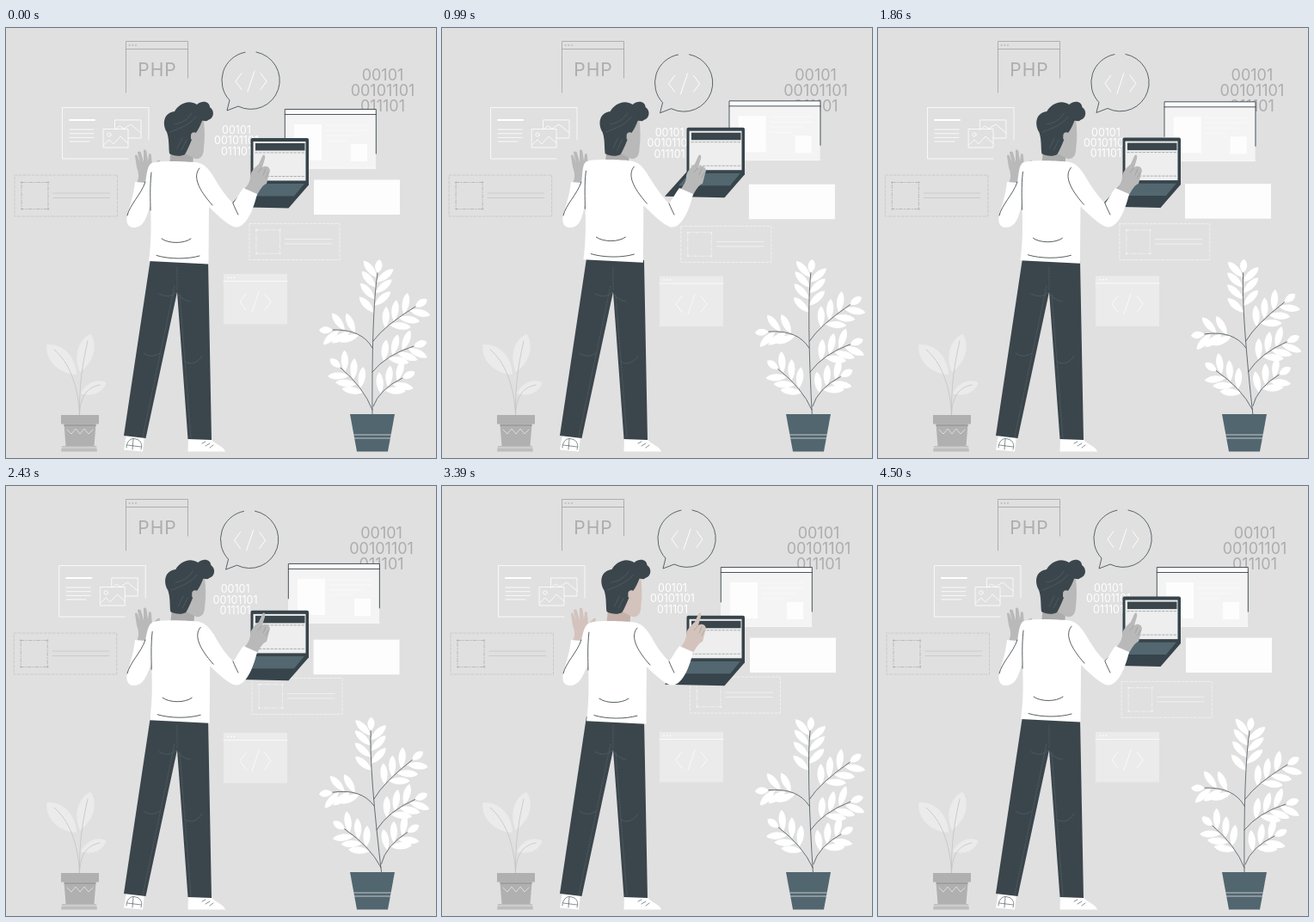
These frames come from a looping animation (500x500 px, 4530 ms). An HTML page:

```html
<!DOCTYPE html>
<html lang="en">
<head>
<meta charset="utf-8">
<title>Developer at work</title>
<style>
html, body { margin: 0; width: 100%; height: 100%; overflow: hidden; background: #e0e0e0; }
svg { display: block; width: 100vw; height: 100vh; }
text { font-family: Inter, "Open Sans", sans-serif; font-weight: 400; text-anchor: middle; }
.line { fill: none; stroke-linecap: round; stroke-linejoin: round; }
.dark { stroke: #37434a; }
.white { stroke: #fff; }
.seam { stroke: #56656d; stroke-width: .6; }
.ink { fill: #3b464c; }
.skin { fill: var(--skin); }
.shade { fill: var(--shade); }
</style>
</head>
<body>
<svg viewBox="0 0 500 500">
  <g id="php" class="line" stroke="#a9a9a9" stroke-width=".9">
    <path d="M139.5 75V15.5H211.5V58M139.5 24.5H211.5"/>
  </g>
  <text x="176" y="56" font-size="21" letter-spacing="1" fill="#adadad">PHP</text>
  <g id="codeR" fill="#adadad"></g>

  <g id="win">
    <path d="M324 94.5H430V163.5H324Z" fill="#f4f4f4"/>
    <path d="M324 95H430V100.5H324ZM335 112H367V154H335ZM401 135H420V155H401Z" fill="#fdfdfd"/>
    <path class="line" stroke="#f9f9f9" d="M372 113H420M372 119H420M372 125H410M372 131H397M324 163.3H430"/>
    <path class="line dark" stroke-width=".9" d="M324.3 135V94.5H430.3V146M324.3 100.5H430.3"/>
  </g>

  <rect id="panel" x="358" y="176.5" width="100" height="40.5" fill="#fdfdfd"/>

  <g id="bubble" class="line">
    <path class="dark" stroke-width=".8" d="M278 28.2A33.5 33.5 0 0 0 260 84L257 96L270 91A33.5 33.5 0 1 0 291 28"/>
  </g>

  <g id="images" class="line white" stroke-width=".8">
    <path d="M142 152H65.5V92.5H166V130"/>
    <path stroke-width="2.2" d="M74 107H103"/>
    <path d="M74 118H102M74 122.7H102M74 127.4H102M74 132H97"/>
    <path d="M126.5 118V107H157V128H142M113.5 117.5H142V139H113.5Z"/>
    <path d="M113.5 136L120 130L125 135L133 126L142 134M128 117L132 114L137 117L145 112L157 122"/>
    <circle cx="120" cy="124" r="2.2"/>
  </g>

  <g id="frameL" class="line" stroke="#c4c4c4" stroke-width=".8"></g>

  <g id="card" class="line white" stroke-width=".7">
    <path fill="#ebebeb" stroke="none" d="M253 286H327V344.5H253Z"/>
    <path d="M253 294.5H327"/>
  </g>

  <g id="codeL" fill="#fff"></g>
  <g id="frameC" class="line" stroke="#f4f4f4" stroke-width=".8"></g>

  <g id="laptop">
    <path fill="#37444b" d="M285 179H352V182.500L328.500 209.500L259 208Z"/>
    <path fill="#536770" d="M288 181H347L335 195.500H275Z"/>
    <rect x="284.5" y="128" width="67.5" height="53" rx="2" fill="#37444b"/>
    <rect x="287.5" y="132" width="61" height="45.5" fill="#eee"/>
    <rect x="290" y="134" width="57.5" height="8.5" class="ink"/>
    <path class="line" stroke="#8c9499" stroke-width=".7" stroke-dasharray="2.5 2" d="M290 145H347M290 172.5H347"/>
  </g>

  <g id="sprout">
    <path class="line" stroke="#c3c3c3" stroke-width=".8" d="M56 374C73 388 84 415 85.5 450M95 364C89 390 85 415 85.5 450M109 415C93 418 86 430 85.5 450"/>
    <path fill="#b0b0b0" d="M64 450H108V460.5H64ZM67.5 461H104.5L102.5 486H69.5Z"/>
    <path fill="#9f9f9f" d="M67.5 460.5H104.5V463H67.7Z"/>
    <path fill="#bdbdbd" d="M65 486H105L106 492.5H64Z"/>
    <path class="line" stroke="#dcdcdc" d="M71 467l5 5l5-6l5 6l5-6l5 6l5-5M65 488H105"/>
  </g>

  <g id="plant"></g>
  <path fill="#526670" d="M400 449H452L444 492.500H408Z"/>
  <path class="line" stroke="#e0e0e0" stroke-width=".8" d="M404.7 473H447.3M405.3 477H446.7"/>

  <g id="man">
    <path fill="#fff" d="M140 473L161 475L159 492.5L137 490.5ZM212 477H238C242 484 253 486 255 492.5H211.5Z"/>
    <path class="line dark" stroke-width=".6" d="M140 488C140 480 146 476 151 478C157 479 159 485 157 490M141 485L157 487M148 478L147 490M228 483L232 481M232 486L237 483M237 488L241 485"/>
    <path class="ink" d="M168 268L235 270L239 479L211.5 478L199 307L162.5 477L137 474Z"/>
    <path class="line seam" d="M178 309C186 314 194 312 198 307C203 315 209 317 214 318M160 378C166 383 173 382 179 378M208 388C214 392 223 390 228 381"/>
    <path class="line seam" stroke-dasharray="2 1.5" d="M199 278V306M196 300L159 475M202 310L215 476"/>
    <g id="head">
      <path class="shade" d="M192 138H219L217 160H190Z"/>
      <path class="skin" d="M208 116L230 107C231 118 231.5 128 230 139C230 149 226 153 220 152L208 146Z"/>
      <path class="ink" d="M187 121C182 113 182 99 196 97C200 89 212 82 222 89C229 83 237 86 237 92C243 96 242 105 235 107C232 110 230 107 228 108C226 113 224 118 220 123C215 130 213 139 208 147C203 150 195 149 190 146C189 138 190 130 187 121Z"/>
      <path class="line seam" d="M191 121C202 117 214 112 221 103M196 112C207 110 212 105 216 99M199 140L205 128M204 142L210 130"/>
      <path class="skin" d="M215 125C215 120 222 120 223 125C223 130 218 132 215 129Z"/>
    </g>
    <path class="skin" d="M151 182C156 174 154 168 152 162L150 149C150 147 152 147 153 149L156 157L153 145C153 143 156 143 157 145L160 156L160 143C160 141 163 141 163.5 144L165 155L166 147C167 145 169 146 169 149L170 162C173 157 176 153 179 154C179 160 173 165 169 170C166 175 163 178 162 183Z"/>
    <path class="skin" d="M275 191C282 182 284 178 284 172C285 166 290 162 294 158L298 149C300 146 302 148 301 152L298 162C304 158 309 164 306 169L303 181C299 182 295 188 291 196Z"/>
    <path class="line" stroke="#8d8d8d" stroke-width=".5" d="M297 163L293 168M302 164L299 171M305 168L302 174"/>
    <path id="shirt" fill="#fff"/>
    <path id="folds" class="line" stroke="#2c363b" stroke-width=".8"/>
  </g>
</svg>
<script>
const LOOP = 4530, LOW = 1330, HIGH = 2930;
const el = id => document.getElementById(id);
const add = (id, html) => el(id).insertAdjacentHTML("beforeend", html);
const mix = (a, b, k) => a + (b - a) * k;

// Repeated parts
const dots = (x, y) => `<path stroke-width="1.6" d="M${x} ${y}h.1m3.6 0h.1m3.6 0h.1"/>`;
const tag = (x, y, h) =>
  `<path class="white" d="M${x - 11} ${y - h}l-7 ${h}l7 ${h}M${x + 4} ${y - h * 1.25}l-8 ${h * 2.5}M${x + 11} ${y - h}l7 ${h}l-7 ${h}"/>`;
const box = (x, y, w, h, dash) => `<path stroke-dasharray="${dash}" d="M${x} ${y}h${w}v${h}h${-w}z"/>`;

function code(id, x, y, size, gap) {
  ["00101", "00101101", "011101"].forEach((s, i) =>
    add(id, `<text x="${x}" y="${y + i * gap}" font-size="${size}">${s}</text>`));
}

function frame(id, x, y, w, h, side) {
  const top = y + (h - side) / 2, lines = x + side + 14;
  add(id, box(x, y, w, h, "3 2") +
    `<g stroke="${id === "frameL" ? "#b0b0b0" : ""}">` + box(x + 8, top, side, side, "4 2 1 2") +
    `<path stroke-width="1.8" d="M${x + 8} ${top}h.1m${side} 0h.1m0 ${side}h.1m${-side} 0h.1"/></g>` +
    `<path d="M${lines} ${y + h / 2 - 3}H${x + w - 9}m0 5.5H${lines}"/>`);
}

// Pointed leaf growing from (x, y) at an angle
function leaf(x, y, angle, len, half) {
  const c = Math.cos(angle), s = Math.sin(angle);
  const at = (k, n) => `${x + c * len * k - s * n * half} ${y + s * len * k + c * n * half}`;
  return `<path d="M${x} ${y}C${at(.35, 1.4)} ${at(.8, 1.2)} ${at(1, 0)}C${at(.8, -1.2)} ${at(.35, -1.4)} ${x} ${y}Z"/>`;
}

// Quadratic twig with alternating leaves on its outer part
function twig(x0, y0, cx, cy, x1, y1, count, from) {
  let out = "";
  for (let i = 0; i < count; i++) {
    const k = mix(from, 1, i / (count - 1));
    const x = mix(mix(x0, cx, k), mix(cx, x1, k), k);
    const y = mix(mix(y0, cy, k), mix(cy, y1, k), k);
    const way = Math.atan2(mix(cy - y0, y1 - cy, k), mix(cx - x0, x1 - cx, k));
    const turn = i === count - 1 ? 0 : (i % 2 ? 1 : -1) * .8;
    out += leaf(x, y, way + turn, i === count - 1 ? 16 : 25, 4.2);
  }
  add("plant", `<g fill="#fff">${out}</g><path class="line dark" stroke-width=".7" d="M${x0} ${y0}Q${cx} ${cy} ${x1} ${y1}"/>`);
}

add("php", dots(143.5, 20));
add("bubble", tag(285, 62, 9.5));
add("card", dots(258, 290.3) + tag(290, 318.5, 9.5));
code("codeR", 438, 61, 18, 18);
code("codeL", 268, 123, 12.5, 12.3);
frame("frameL", 10, 171, 119.5, 48, 31);
frame("frameC", 283, 227.5, 105, 42, 27.5);
el("sprout").insertAdjacentHTML("afterbegin",
  `<g fill="#ebebeb">${leaf(82, 403, -2.35, 49, 11)}${leaf(86, 400, -1.3, 46, 9.5)}${leaf(87, 425, -.4, 32, 7)}</g>`);

twig(426, 456, 425, 330, 432, 285, 8, .62);
twig(427, 364, 440, 346, 476, 324, 7, .4);
twig(426, 372, 414, 350, 380, 351, 6, .45);
twig(426, 400, 442, 380, 474, 370, 7, .35);
twig(426, 444, 416, 418, 389, 395, 7, .4);
twig(427, 440, 434, 420, 461, 407, 6, .4);

// Offset of each floating item at its farthest point
const drift = {
  bubble: [-4.6, 3.7], codeR: [-4.6, .6], codeL: [-4.6, 4], win: [13, -13],
  panel: [-1.5, 7], frameL: [-2.5, 0], images: [-12, 0], card: [0, 3.5]
};

const move = (id, x, y) => el(id).setAttribute("transform", `translate(${x} ${y})`);

const floatAt = t => t < LOW ? t / LOW : Math.max(0, (HIGH - t) / (HIGH - LOW));

function swing(t, low, high) {
  if (t < LOW) return low * t / LOW;
  if (t < HIGH) return mix(low, high, (t - LOW) / (HIGH - LOW));
  return high * (LOOP - t) / (LOOP - HIGH);
}

// The torso shifts while elbows and wrists stay put
function dress(bx, by) {
  const p = (x, y) => `${x + bx} ${y + by}`;
  el("shirt").setAttribute("d",
    `M${p(171, 156.5)}C${p(182, 154)} ${p(206, 155)} ${p(218, 156)}C${p(230, 156)} ${p(236, 164)} ${p(242, 174)}` +
    `C249 186 256 196 264 204C268 199 272 191 276 186L292 193C289 206 281 231 268 231.5` +
    `C262 232 250 222 ${p(236, 208)}L${p(235.5, 274.5)}L${p(166, 271)}C${p(169, 250)} ${p(169, 230)} ${p(168, 205)}` +
    `C163 222 160 232 148 232C139 231 139 221 143 210C147 198 149 188 150 179L162 180C164 170 ${p(164, 158)} ${p(171, 156.5)}Z`);
  el("folds").setAttribute("d",
    `M162 179C157 194 144 205 141 218M${p(169, 168)}C${p(167, 185)} ${p(168, 200)} ${p(168, 212)}` +
    `M${p(225, 163)}C${p(217, 172)} ${p(223, 187)} ${p(240, 206)}M264 204C266 209 268 213 270 217` +
    `M${p(181, 245)}C${p(189, 251)} ${p(207, 251)} ${p(215, 245)}M${p(175, 264.5)}C${p(190, 269)} ${p(211, 269)} ${p(225, 265)}`);
}

function draw(t) {
  const f = floatAt(t);
  for (const id in drift) move(id, drift[id][0] * f, drift[id][1] * f);
  move("laptop", 0, swing(t, -16.5, 32));
  move("frameC", swing(t, -7, 7.6), swing(t, 4, -7.7));
  move("head", swing(t, -.5, 2), 0);
  dress(swing(t, -2.2, 2.7), swing(t, -2.5, 3));
  const sway = 6.5 * Math.sin(Math.PI * t / LOOP) ** 2;
  el("plant").setAttribute("transform", `rotate(${-sway} 426 355)`);
  const warm = t >= HIGH && t < 4350;
  el("man").style.setProperty("--skin", warm ? "#d3c3bc" : "#b9b9b9");
  el("man").style.setProperty("--shade", warm ? "#c4b1aa" : "#ababab");
}

const start = performance.now();
function tick() {
  draw((performance.now() - start) % LOOP);
  requestAnimationFrame(tick);
}
tick();
</script>
</body>
</html>
```
